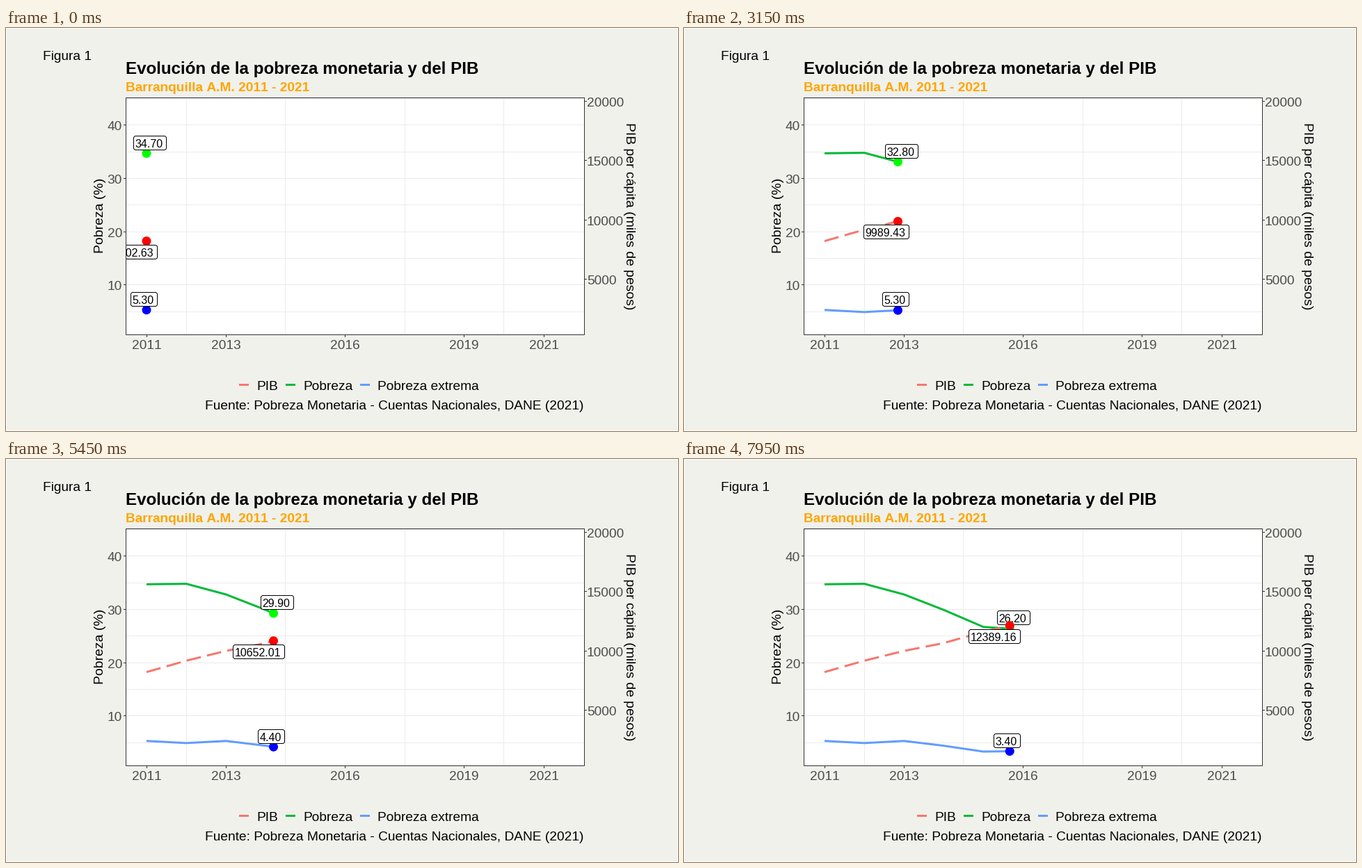
These frames come from a looping animation (966 px wide and 580 px high, 8 s). A matplotlib script:

```python
import numpy as np
import matplotlib.pyplot as plt
from matplotlib.animation import FuncAnimation
from matplotlib.patches import Circle, FancyBboxPatch, Rectangle
from matplotlib.transforms import Bbox, TransformedBbox

W, H, DPI = 966, 580, 96
PT = 72 / DPI                     # points per pixel
FRAMES, STEP = 160, 50
YEARS_PER_FRAME = 1 / 34.1
LEFT, TOP, RIGHT, BOTTOM = 172.5, 100.5, 831.5, 441.5
GREY = "#4D4D4D"

plt.rcParams.update({
    "font.family": "Liberation Sans",
    "text.kerning_factor": 6,
    "path.snap": False,           # all crisp edges are placed on half pixels
})

fig = plt.figure(figsize=(W / DPI, H / DPI), dpi=DPI, facecolor="#F0F1EB")
ax = fig.add_axes([0, 0, 1, 1])
ax.set_xlim(0, W)
ax.set_ylim(H, 0)
ax.axis("off")


def px(year):
    return 202 + 57.1 * (year - 2011)


def py(value):
    return 446.4 - 7.667 * value


def snap(v):
    return np.floor(v) + 0.5


def text(x, y, s, size=19.1, **kw):
    return ax.text(x, y, s, fontsize=size * PT, va="baseline", **kw)


def line(xs, ys, color, width=1, **kw):
    return ax.plot(xs, ys, color=color, lw=width * PT,
                   solid_capstyle="butt", dash_capstyle="butt", **kw)[0]


def frame_rect(x0, y0, x1, y1, edge, face, z):
    ax.add_patch(Rectangle((x0, y0), x1 - x0, y1 - y0, ec=edge, fc=face,
                           lw=PT, zorder=z))


# Panel, grid and axes
frame_rect(0.5, 0.5, W - 0.5, H - 0.5, "white", "none", 0)
frame_rect(LEFT, TOP, RIGHT, BOTTOM, "none", "white", 0)
for v in range(5, 50, 5):
    line([LEFT, RIGHT], [snap(py(v))] * 2, "#EBEBEB", zorder=1)
for year in (2012, 2014.5, 2017.5, 2020):
    line([snap(px(year))] * 2, [TOP, BOTTOM], "#EBEBEB", zorder=1)
frame_rect(LEFT, TOP, RIGHT, BOTTOM, "#333333", "none", 50)

for v in (10, 20, 30, 40):
    y = snap(py(v))
    line([169, 172], [y, y], "#333333")
    text(167, y + 7.5, str(v), color=GREY, ha="right")
for v in (5000, 10000, 15000, 20000):
    y = snap(py(v / 450))
    line([832, 835], [y, y], "#333333")
    text(835, y + 7.5, str(v), color=GREY)
for year in (2011, 2013, 2016, 2019, 2021):
    x = snap(px(year))
    line([x, x], [442, 445], "#333333")
    text(x - 0.5, 462, str(year), color=GREY, ha="center")

# Titles, caption and legend
text(53, 46, "Figura 1")
text(172, 66, "Evolución de la pobreza monetaria y del PIB", 24.1, weight="bold")
text(172, 91, "Barranquilla A.M. 2011 - 2021", weight="bold", color="orange")
text(831, 549, "Fuente: Pobreza Monetaria - Cuentas Nacionales, DANE (2021)",
     ha="right")
text(140, 269.5, "Pobreza (%)", 19.4, rotation=90, rotation_mode="anchor",
     ha="center")
text(891, 270.5, "PIB per cápita (miles de pesos)", 19.4, rotation=270,
     rotation_mode="anchor", ha="center")

SALMON, GREEN, BLUE = "#F8766D", "#00BA38", "#619CFF"
for x, label, color in ((335, "PIB", SALMON), (402, "Pobreza", GREEN),
                        (509, "Pobreza extrema", BLUE)):
    line([x, x + 14], [513.5, 513.5], color, 3)
    text(x + 25, 521, label)

panel = TransformedBbox(Bbox([[LEFT, TOP], [RIGHT, BOTTOM]]), ax.transData)


class Series:
    """A growing line with a leading dot and a value label."""

    def __init__(self, values, scale, color, dot, dy, z, left=None, dash="-"):
        self.values = np.array(values)
        self.ys = py(self.values / scale)
        self.left, self.dy = left, dy
        self.line = line([], [], color, 3, ls=dash, zorder=z)
        self.dot = Circle((0, 0), 6.5, fc=dot, ec="none", zorder=z + 1)
        self.box = FancyBboxPatch(
            (0, 0), 1, 1, boxstyle="round,pad=0,rounding_size=3",
            fc="white", ec="black", lw=PT, zorder=z + 2)
        ax.add_patch(self.dot)
        ax.add_patch(self.box)
        self.label = text(0, 0, "", 16, ha="center", zorder=z + 3,
                          clip_on=True)
        for art in (self.line, self.dot, self.box, self.label):
            art.set_clip_box(panel)

    def update(self, t):
        idx = np.arange(len(self.values))
        x, y = px(2011 + t), np.interp(t, idx, self.ys)
        past = idx[idx < t]
        self.line.set_data(np.append(px(2011 + past), x),
                           np.append(self.ys[past], y))
        self.dot.center = x, y

        s = f"{self.values[int(t + 0.5)]:.2f}"
        w = 9 * (len(s) - 1) + 4 + 7
        x0 = x + (15.6 - w if self.left is None else self.left)
        x0, y0 = snap(x0), snap(y + self.dy - 10)
        self.box.set_bounds(x0, y0, w, 20)
        self.label.set_text(s)
        self.label.set_position((x0 + w / 2 - 1.5, y0 + 16.5))


series = [
    Series([34.7, 34.8, 32.8, 29.9, 26.7, 26.2], 1,
           GREEN, "#00FF00", -15.3, 10, left=-18.2),
    Series([5.3, 4.9, 5.3, 4.4, 3.3, 3.4], 1,
           BLUE, "#0000FF", -15.3, 20),
    Series([8202.63, 9162.25, 9989.43, 10652.01, 11605.11, 12389.16], 450,
           SALMON, "#FF0000", 15.6, 30, dash=(0, (7, 3))),
]


def draw(i):
    for s in series:
        s.update(i * YEARS_PER_FRAME)
    return []


anim = FuncAnimation(fig, draw, frames=FRAMES, interval=STEP,
                     init_func=lambda: draw(0), repeat=True, repeat_delay=0,
                     blit=False)
plt.show()
```
